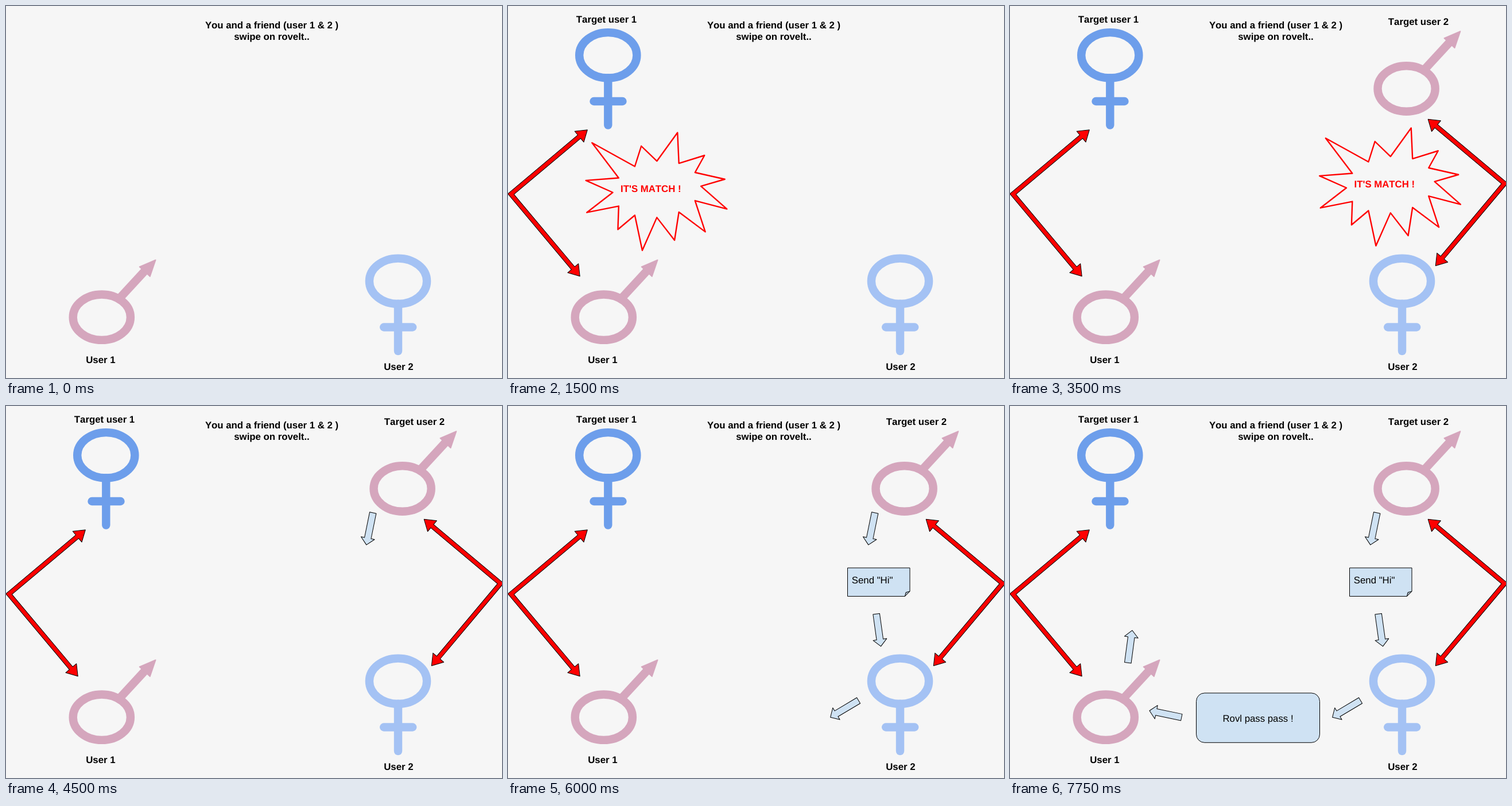
Animation of 864 by 648 pixels, one loop 8 s. Source, as an HTML page with a canvas:

```html
<!DOCTYPE html>
<html lang="en">
<head>
<meta charset="utf-8">
<title>Match relay</title>
<style>
  html, body { margin: 0; width: 100%; height: 100%; overflow: hidden; background: #f6f6f6; }
  canvas { display: block; width: 864px; height: 648px; }
</style>
</head>
<body>
<canvas id="stage" width="864" height="648"></canvas>
<script>
const ctx = document.getElementById('stage').getContext('2d');
const LOOP = 8000;
const PAPER = '#f6f6f6', PINK = '#d5a6bd', PALE = '#a4c2f4', BLUE = '#6d9eeb', ICE = '#cfe2f3', RED = '#ff0000';
const THICK = 14.4, THIN = 1;
const rad = deg => deg * Math.PI / 180;

function trace(points) {
  ctx.beginPath();
  for (const [x, y] of points) ctx.lineTo(x, y);
  ctx.closePath();
}

function paint(fill, line, width) {
  if (fill) {
    ctx.fillStyle = fill;
    ctx.fill();
  }
  ctx.strokeStyle = line;
  ctx.lineWidth = width;
  ctx.stroke();
}

function text(str, x, y, { weight = 'bold', color = '#000', align = 'left' } = {}) {
  ctx.font = `${weight} 16.8px "Liberation Sans", Arial, sans-serif`;
  ctx.fontKerning = 'none';
  ctx.textRendering = 'geometricPrecision';
  ctx.textAlign = align;
  ctx.fillStyle = color;
  ctx.fillText(str, x, y);
}

// Runs draw in a frame moved to (x, y), turned, and mirrored if side is -1
function place(x, y, angle, side, draw) {
  ctx.save();
  ctx.translate(x, y);
  ctx.scale(side, 1);
  ctx.rotate(rad(angle));
  draw();
  ctx.restore();
}

function ring(x, y, color) {
  ctx.beginPath();
  ctx.ellipse(x, y, 50.1, 39.7, 0, 0, Math.PI * 2);
  paint(null, color, THICK);
}

function bar(x1, y1, x2, y2, color, cap) {
  ctx.lineCap = cap;
  ctx.beginPath();
  ctx.moveTo(x1, y1);
  ctx.lineTo(x2, y2);
  paint(null, color, THICK);
}

function male(x, y) {
  ring(x, y, PINK);
  bar(x + 32.4, y - 34.5, x + 74.4, y - 80, PINK, 'butt');
  trace([[x + 93.8, y - 99.8], [x + 65.8, y - 87.9], [x + 84, y - 71]]);
  paint(PINK, PINK, 1.8);
}

function female(x, y, color) {
  ring(x, y, color);
  bar(x, y + 39.5, x, y + 121.8, color, 'round');
  bar(x - 24.8, y + 80.2, x + 25.2, y + 80.2, color, 'round');
}

// Arrowheads at both ends of a right angle, one arm along each axis
function bentArrow(x, y, side) {
  const half = 3.8, wing = 12.3, head = 18.5, a = 174, b = 187;
  place(x, y, -40, side, () => {
    trace([
      [-half, -half], [a - head, -half], [a - head, -wing], [a, 0],
      [a - head, wing], [a - head, half], [half, half], [half, b - head],
      [wing, b - head], [0, b], [-wing, b - head], [-half, b - head]
    ]);
    paint(RED, '#000', THIN);
  });
}

function smallArrow(x, y, angle) {
  const len = 57, half = 5.8, wing = 12, neck = len - wing;
  place(x, y, angle, 1, () => {
    trace([[0, -half], [neck, -half], [neck, -wing], [len, 0], [neck, wing], [neck, half], [0, half]]);
    paint(ICE, '#000', THIN);
  });
}

// Twelve spikes of uneven length around a slightly tilted ellipse
function burst(x, y) {
  const lengths = [114, 99, 106, 111, 104, 93, 110, 91, 113, 110, 134, 88];
  const points = [];
  const add = (px, py) => points.push([x + px * 1.146, y + py * 0.944]);
  lengths.forEach((len, i) => {
    const valley = rad(i * 30 - 90);
    const tip = rad(i * 30 - 76.2 + 3.4 * Math.cos(rad(i * 30 - 50)));
    add(67 * Math.cos(valley), 52 * Math.sin(valley) - 5.8 * Math.cos(valley) - 5);
    add(len * Math.cos(tip), len * Math.sin(tip));
  });
  trace(points);
  paint(null, RED, 2.4);
  text("IT'S MATCH !", x - 63.3, y - 0.4, { color: RED });
}

function note() {
  const left = 591.5, top = 282, right = 700, bottom = 331.5, fold = 8.6;
  trace([[left, top], [right, top], [right, bottom - fold], [right - fold, bottom], [left, bottom]]);
  paint(ICE, '#000', THIN);
  trace([[right - fold, bottom], [right - fold * 0.8, bottom - fold * 0.8], [right, bottom - fold]]);
  paint('#a6b5c2', '#000', THIN);
  text('Send "Hi"', 598.8, 308.6, { weight: 'normal' });
}

function reply() {
  ctx.beginPath();
  ctx.roundRect(324.5, 500, 215, 86.3, 14.4);
  paint(ICE, '#000', THIN);
  text('Rovl pass pass !', 432, 549.6, { weight: 'normal', align: 'center' });
}

// [start, end, draw]
const scenes = [
  [0, LOOP, () => {
    text('You and a friend (user 1 & 2 )', 463, 38.6, { align: 'center' });
    text('swipe on rovelt..', 463, 58.6, { align: 'center' });
    male(166.8, 542.2);
    text('User 1', 139.2, 621.6);
    female(683, 479.3, PALE);
    text('User 2', 658.2, 633.6);
  }],
  [500, LOOP, () => {
    female(174.3, 85.8, BLUE);
    text('Target user 1', 118.8, 28.6);
  }],
  [1000, LOOP, () => bentArrow(5, 327.6, 1)],
  [1500, 2500, () => burst(259.3, 324)],
  [2500, LOOP, () => {
    male(690.6, 144);
    text('Target user 2', 658.8, 32.8);
  }],
  [3000, LOOP, () => bentArrow(861.5, 309.2, -1)],
  [3500, 4500, () => burst(662.8, 316)],
  [4500, LOOP, () => smallArrow(639.2, 186, 101.5)],
  [5000, LOOP, note],
  [5500, LOOP, () => smallArrow(641.6, 362.2, 82)],
  [6000, LOOP, () => smallArrow(610.6, 513, 149.2)],
  [6500, LOOP, reply],
  [7000, LOOP, () => smallArrow(298.8, 542.3, 191.7)],
  [7750, LOOP, () => smallArrow(205.3, 447.3, -82.4)]
];

function render(t) {
  ctx.fillStyle = PAPER;
  ctx.fillRect(0, 0, 864, 648);
  for (const [start, end, draw] of scenes) {
    if (t >= start && t < end) draw();
  }
}

const begin = performance.now();
function tick(now) {
  render(Math.max(0, now - begin) % LOOP);
  requestAnimationFrame(tick);
}
ctx.lineJoin = 'round';
render(0);
requestAnimationFrame(tick);
</script>
</body>
</html>
```
